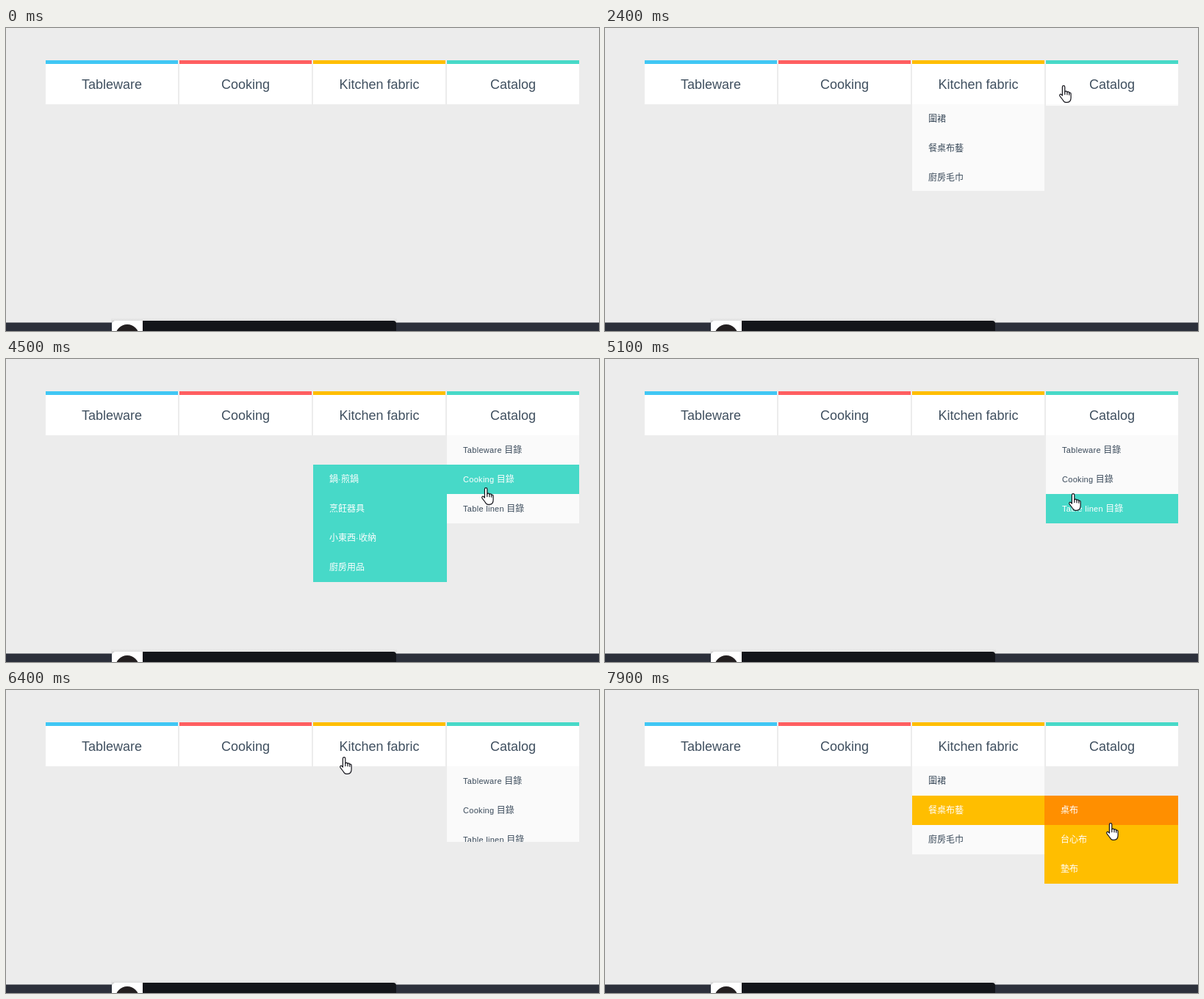
These frames come from a looping animation (807x413 px, 8 s). An HTML page:

```html
<!DOCTYPE html>
<html lang="zh-Hant">
<head>
<meta charset="utf-8">
<title>Menu</title>
<style>
html, body { margin: 0; width: 100%; height: 100%; overflow: hidden; background: #ececec; }
svg { display: block; }
.tab { font: 18px "Liberation Sans", Arial, sans-serif; fill: #3f4f5f; text-anchor: middle; }
.item { font: 12px "Noto Sans CJK TC", "Noto Sans CJK", "Noto Sans CJK JP", sans-serif; white-space: pre; }
.latin { font: 11px "Liberation Sans", Arial, sans-serif; letter-spacing: .3px; }
</style>
</head>
<body>
<svg width="807" height="413" viewBox="0 0 807 413">
  <defs>
    <linearGradient id="shade" x2="0" y2="1">
      <stop offset="0" stop-color="#000" stop-opacity="0"/>
      <stop offset="1" stop-color="#000" stop-opacity=".07"/>
    </linearGradient>
  </defs>
  <rect width="807" height="413" fill="#ececec"/>
  <rect y="401.5" width="807" height="12" fill="#2c303b"/>
  <rect x="143" y="395" width="389" height="5" fill="url(#shade)"/>
  <rect x="144" y="399" width="387" height="30" rx="4" fill="#121419"/>
  <path d="M186 399H148a4 4 0 0 0-4 4v10h42z" fill="#fff"/>
  <circle cx="165" cy="420" r="16" fill="#231f20"/>
  <g id="menus"></g>
  <g id="hand" fill="#fff" stroke="#15151c" stroke-width="1.2" stroke-linejoin="round" stroke-linecap="round">
    <path d="M4.4 14V2.4a1.7 1.7 0 0 1 3.4 0V9c.6-1.4 3-1.2 3.2.4.8-1 2.6-.6 2.8.9 1-.6 2.3-.1 2.3 1.2V17c0 3.6-1.7 6.3-5.2 6.3H9C7 23.3 6 22 5 20L.9 14.6C.1 13 1.6 11.6 2.9 12.6z"/>
    <path fill="none" d="M7.8 9v3.6M11 9.6v3.2M13.8 10.4v2.8"/>
  </g>
</svg>
<script>
const NS = "http://www.w3.org/2000/svg";
const LOOP = 8000, STEP = 100, SLIDE = 200, DELAY = 15;
const ROW = 40, TOP = 104, PITCH = 182, INK = "#3a4a5a";

const MENUS = [
  { name: "Tableware", color: "#40c7f4", items: ["餐盤", "杯壺", "刀叉匙", "餐桌用品"] },
  { name: "Cooking", color: "#ff5e60", items: ["鍋·煎鍋", "烹飪器具", "廚房用品"] },
  { name: "Kitchen fabric", color: "#ffbe00", dark: "#ff8f00", items: ["圍裙", "餐桌布藝", "廚房毛巾"],
    side: 180, more: ["桌布", "台心布", "墊布"] },
  { name: "Catalog", color: "#47d9c8", dark: "#18b69c",
    items: ["Tableware 目錄", "Cooking 目錄", "Table linen 目錄"],
    side: -PITCH, more: ["鍋·煎鍋", "烹飪器具", "小東西·收納", "廚房用品"] }
];

// Turning points of the pointer: tenths of a second, left, top.
const PATH = [
  // in from the right, up to the first tab
  [2, 692, 238], [3, 475, 248], [4, 318, 222], [6, 183, 78], [9, 180, 76], [13, 180, 76],
  // along the tabs
  [14, 185, 79], [16, 270, 78], [18, 295, 78], [20, 453, 78], [23, 540, 78], [24, 618, 78], [26, 649, 78],
  // down the last menu
  [32, 647, 77], [36, 649, 90], [37, 652, 158], [39, 653, 160], [44, 653, 160], [46, 640, 190], [50, 640, 190],
  // into its side menu and out
  [51, 631, 183], [54, 555, 160], [58, 478, 218], [59, 477, 219], [63, 468, 172], [64, 454, 91], [66, 447, 69],
  // down the third menu and across
  [67, 447, 69], [72, 498, 147], [76, 563, 163], [79, 682, 181]
];

function add(parent, tag, attrs, text) {
  const el = document.createElementNS(NS, tag);
  for (const k in attrs) el.setAttribute(k, attrs[k]);
  if (text) el.textContent = text;
  parent.appendChild(el);
  return el;
}

function makePanel(x, y, w, items) {
  const box = add(root, "svg", { x, y, width: w, height: 0, overflow: "hidden" });
  const rows = items.map((label, i) => {
    const rect = add(box, "rect", { y: i * ROW, width: w, height: ROW });
    const text = add(box, "text", { x: 22, y: i * ROW + 24, class: "item" });
    for (const part of label.split(/([ -~·]+)/))
      if (part) add(text, "tspan", /[ -~·]/.test(part) ? { class: "latin" } : {}, part);
    return { rect, text };
  });
  return { box, rows, x, y, w, h: items.length * ROW, spans: [] };
}

const root = document.getElementById("menus");
const hand = document.getElementById("hand");
MENUS.forEach((m, i) => {
  const x = 54 + i * PITCH;
  m.tab = { x, y: 44, w: 180, h: 60 };
  add(root, "rect", { x, y: 44, width: 180, height: 60, fill: "#fff" });
  add(root, "rect", { x, y: 44, width: 180, height: 5, fill: m.color });
  add(root, "text", { x: x + 90, y: 83, class: "tab" }, m.name);
});
for (const m of MENUS) {
  m.panel = makePanel(m.tab.x, TOP, 180, m.items);
  if (m.more) m.sub = makePanel(m.tab.x + m.side, TOP + ROW, PITCH, m.more);
}

const swing = p => 0.5 - Math.cos(Math.PI * Math.min(1, Math.max(0, p))) / 2;

function pointer(t) {
  const s = t / 100;
  if (s < PATH[0][0]) return null;
  const i = PATH.findIndex(k => k[0] > s);
  if (i < 0) return PATH[PATH.length - 1].slice(1);
  const [a, ax, ay] = PATH[i - 1], [b, bx, by] = PATH[i];
  const p = (s - a) / (b - a);
  return [ax + (bx - ax) * p, ay + (by - ay) * p];
}

// Row under the fingertip, or -1 when it is outside.
function rowAt(box, pos, height = box.h) {
  if (!pos) return -1;
  const x = pos[0] + 6 - box.x, y = pos[1] + 1 - box.y;
  return x >= 0 && x < box.w && y >= 0 && y < height ? Math.floor(y / ROW) : -1;
}

function setOpen(panel, on, t) {
  const last = panel.spans[panel.spans.length - 1];
  const isOpen = last && last[1] === Infinity;
  if (on && !isOpen) panel.spans.push([t, Infinity]);
  if (!on && isOpen) last[1] = t;
}

// Follow the pointer once to learn when each panel opens and closes.
function plan() {
  let current = null, inSub = false;
  for (let t = 0; t < LOOP; t++) {
    const pos = pointer(t - DELAY);
    const over = box => rowAt(box, pos) >= 0;
    const next = MENUS.find(m => over(m.tab) ||
      (m === current && (over(m.panel) || (inSub && over(m.sub)))));
    inSub = !!(next && next.sub) &&
      (rowAt(next.panel, pos) === 1 || (inSub && over(next.sub)));
    current = next;
    for (const m of MENUS) {
      setOpen(m.panel, m === current, t);
      if (m.sub) setOpen(m.sub, m === current && inSub, t);
    }
  }
}

function heightAt(panel, t) {
  const part = panel.spans.map(([a, b]) =>
    swing((Math.min(t, b) - a) / SLIDE) * (1 - swing((t - b) / SLIDE)));
  return Math.round(Math.max(0, ...part) * panel.h);
}

function paint(panel, height, active, base, hot, ink) {
  panel.box.setAttribute("height", height);
  panel.box.style.display = height > 0 ? "" : "none";
  panel.rows.forEach((r, i) => {
    r.rect.setAttribute("fill", i === active ? hot : base);
    r.text.setAttribute("fill", i === active ? "#fff" : ink);
  });
}

function draw(t) {
  const pos = pointer(t);
  hand.style.display = pos ? "" : "none";
  if (pos) hand.setAttribute("transform", `translate(${pos.map(Math.round)})`);
  for (const m of MENUS) {
    const height = heightAt(m.panel, t);
    let active = rowAt(m.panel, pos, height);
    if (m.sub) {
      // A sliding parent clips its side panel.
      const h = height === m.panel.h ? heightAt(m.sub, t) : 0;
      const row = rowAt(m.sub, pos, h);
      if (row >= 0) active = 1;
      paint(m.sub, h, row, m.color, m.dark, "#fff");
    }
    paint(m.panel, height, active, "#fafafa", m.color, INK);
  }
}

plan();
const start = performance.now();
function tick() {
  const t = (performance.now() - start) % LOOP;
  draw(Math.floor(t / STEP) * STEP);
  requestAnimationFrame(tick);
}
draw(0);
requestAnimationFrame(tick);
</script>
</body>
</html>
```
